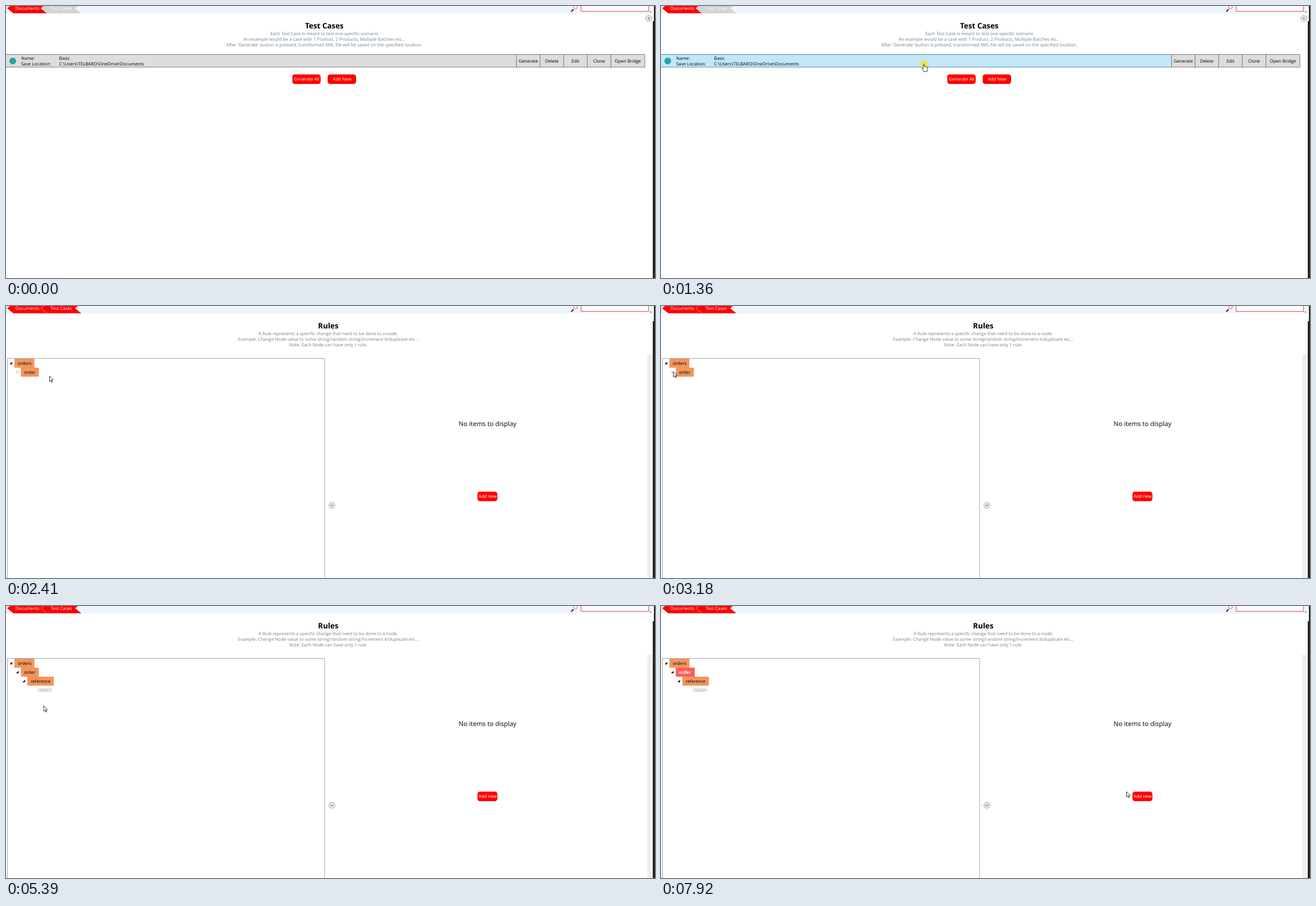
Recreate the animation shown at these times as an HTML page. Size 1155x485 px, loop 7.99 s.

```html
<!DOCTYPE html>
<html lang="en">
<head>
<meta charset="utf-8">
<title>Test case editor</title>
<style>
html, body { margin: 0; width: 100%; height: 100%; overflow: hidden; background: #fff; }
svg { display: block; width: 100%; height: 100%; }
text { font: 7.93px "Open Sans", "Noto Sans", sans-serif; text-rendering: geometricPrecision; white-space: pre; }
.mid text, text.mid { text-anchor: middle; }
.head { font-size: 13.4px; font-weight: 700; }
.note { fill: #708090; }
.red { fill: #f00; }
.white { fill: #fff; }
.cell { fill: #ddd; stroke: #707070; stroke-width: .9; }
.cell.hover { fill: #c4e6f6; stroke: #3c7fb1; }
.node { fill: #f2955d; }
.round { fill: #e4e4e4; stroke: #999; stroke-width: .7; }
.chevron { fill: none; stroke: #333; stroke-width: 1; }
.shut { fill: #fff; stroke: #aaa; stroke-width: .7; }
.cursor { fill: #fff; stroke: #000; stroke-width: .8; stroke-linejoin: round; }
#picked rect { fill: #ff5e54; }
#picked text { fill: #fff; font-weight: 700; }
</style>
</head>
<body>
<svg viewBox="0 0 1155 485">
  <rect width="1150" height="13.5" fill="#eef4fc"/>
  <path class="red" d="M2 4L7 0H67L62 4L73 13H13Z"/>
  <path id="tab" d="M62 4L67 0H128L123 4L134 13H73Z"/>
  <path d="M67 0L62 4L73 13" fill="none" stroke="#fff" stroke-opacity=".55" stroke-width=".7"/>
  <path d="M.5 0V13" stroke="#888" stroke-dasharray="1 1.5" stroke-width=".7"/>
  <g class="mid white"><text x="38" y="7">Documents</text><text x="98.5" y="7">Test Cases</text></g>
  <circle cx="1013.5" cy="2" r="3.2" fill="#fff" stroke="#f0583c"/>
  <path d="M1010 6L1006 10" stroke="#111" stroke-width="1.8"/>
  <rect x="1023.5" y="-5" width="120" height="14.5" fill="#fff" stroke="#e8484c"/>
  <path d="M1145.5 10H1149L1147.2 12Z" fill="#555"/>
  <path d="M1153 0H1155V485H1151V27H1153Z" fill="#25271f"/>

  <g id="cases">
    <g class="mid">
      <text class="head" x="566.5" y="40">Test Cases</text>
      <g class="note">
        <text x="566.5" y="51.6">Each Test Case is meant to test one specific scenario</text>
        <text x="566.5" y="61.9">An example would be a case with 1 Product, 2 Products, Multiple Batches etc...</text>
        <text x="566.5" y="72.3">After 'Generate' button is pressed, transformed XML file will be saved on the specified location.</text>
      </g>
    </g>
    <circle class="round" cx="1144" cy="22" r="5.5"/>
    <path class="chevron" d="M1145 20L1143 22L1145 24"/>
    <rect id="row" class="cell" x="-1" y="86.5" width="909.5" height="22.5"/>
    <circle cx="12" cy="98" r="6" fill="#22a5a8"/>
    <text x="27" y="95.8">Name:</text><text x="94.5" y="95.8">Basic</text>
    <text x="27" y="106.1">Save Location:</text><text x="94.5" y="106.1">C:\Users\TELBARO\OneDrive\Documents</text>
    <g id="actions" class="mid"></g>
    <g class="mid">
      <rect class="red" x="509.5" y="122" width="50.5" height="17" rx="4.5"/>
      <rect class="red" x="572.5" y="122" width="50.5" height="17" rx="4.5"/>
      <text class="white" x="535" y="133">Generate All</text>
      <text class="white" x="598" y="133">Add New</text>
    </g>
  </g>

  <g id="rules">
    <g class="mid">
      <text class="head" x="573.5" y="40">Rules</text>
      <g class="note">
        <text x="573.5" y="51.6">A Rule represents a specific change that need to be done to a node.</text>
        <text x="573.5" y="61.9">Example: Change Node value to some string/random string/increment it/duplicate etc...</text>
        <text x="573.5" y="72.3">Note: Each Node can have only 1 rule.</text>
      </g>
    </g>
    <rect x="2.5" y="93.5" width="564.5" height="400" fill="#fff" stroke="#a3a3a3"/>
    <rect x="1141" y="87" width="9.5" height="398" fill="#f0f0f0"/>
    <path d="M1144.3 93L1146 91.2L1147.7 93" fill="none" stroke="#bbb" stroke-width=".7"/>
    <circle class="round" cx="580" cy="355.3" r="5.5"/>
    <path class="chevron" d="M578 354.5L580 356.5L582 354.5"/>
    <text class="mid" x="857" y="213.7" style="font-size:11.5px">No items to display</text>
    <rect class="red" x="839" y="331" width="35.5" height="17" rx="4.5"/>
    <text class="white mid" x="857" y="342">Add new</text>

    <path d="M11 99.5V104H6.5Z"/>
    <rect class="node" x="15" y="94" width="35.5" height="16"/><text x="21" y="104.7">orders</text>
    <rect class="node" x="26.5" y="110" width="32" height="16"/><text x="32" y="120.8">order</text>
    <g id="picked"><rect x="26.5" y="110" width="33.5" height="16"/><text x="32" y="120.8">order</text></g>
    <path id="shut1" class="shut" d="M19 115.5L22 118L19 120.5Z"/>
    <g id="open1">
      <path d="M22.4 115.5V120H17.9Z"/>
      <rect class="node" x="38" y="126" width="47" height="16"/><text x="44" y="136.6">reference</text>
      <path id="shut2" class="shut" d="M30.8 131.5L33.8 134L30.8 136.5Z"/>
      <g id="open2"><path d="M33.8 131.5V136H29.3Z"/><text x="55.7" y="152.6" fill="#858585">100001</text></g>
    </g>
  </g>

  <g id="pointer">
    <circle id="click" r="7.2" fill="#fae11e" fill-opacity=".75"/>
    <path id="arrow" class="cursor" d="M0 0V9.5L2.2 7.5L3.8 11L5.3 10.3L3.8 7H6.7Z"/>
    <path id="hand" class="cursor" d="M-1.1 .8C-1.1 -.4 1 -.4 1 .8V4.6C1.3 4 2.8 4.1 2.9 5C3.4 4.5 4.7 4.7 4.8 5.6C5.4 5.2 6.6 5.5 6.6 6.6V9.2C6.6 11 5.6 11.5 5.4 13.2H-.6C-.8 11.5 -2.8 9.8 -3.8 7.9C-4.2 6.9 -2.9 6.3 -1.1 8.2Z"/>
  </g>
</svg>
<script>
const LOOP = 7990, ENTER = 140, PAGE = 1500, EXPAND1 = 3780, EXPAND2 = 5260, PICK = 6960;
const clicks = [[1360, 1500], [3710, 3850], [5190, 5260], [6960, 7030]];
// pointer tip: time, x, y
const path = [
  [140, 1090, 478], [400, 700, 230], [760, 468, 103.7], [1700, 468, 103.7],
  [2130, 236, 165], [2410, 77.5, 125], [2960, 26, 117], [3180, 22, 117],
  [3850, 22, 117], [4030, 42, 148], [4240, 49, 139.5], [4460, 46, 134],
  [4990, 34, 133], [5260, 34, 133], [5390, 67, 178], [5530, 73, 199],
  [5930, 62, 132], [6210, 62, 131], [6560, 48, 117], [7100, 48, 117], [7920, 828.5, 331]
];
const $ = id => document.getElementById(id);
const show = (id, on) => $(id).style.display = on ? '' : 'none';
const inside = ([x, y], l, t, r, b) => x >= l && x <= r && y >= t && y <= b;

const edges = [908.5, 950.5, 992.5, 1034.5, 1076.5, 1137];
$('actions').innerHTML = ['Generate', 'Delete', 'Edit', 'Clone', 'Open Bridge'].map((label, i) => {
  const x = edges[i], w = edges[i + 1] - x;
  return `<rect class="cell" x="${x}" y="86.5" width="${w}" height="22.5"/><text x="${x + w / 2}" y="100.8">${label}</text>`;
}).join('');

function tipAt(t) {
  const i = path.findIndex(p => p[0] > t);
  if (i < 0) return path.at(-1).slice(1);
  if (i === 0) return path[0].slice(1);
  const a = path[i - 1], b = path[i], k = (t - a[0]) / (b[0] - a[0]);
  return [a[1] + (b[1] - a[1]) * k, a[2] + (b[2] - a[2]) * k];
}

function draw(t) {
  const tip = tipAt(t), rules = t >= PAGE, open1 = t >= EXPAND1, open2 = t >= EXPAND2;
  const onRow = !rules && t >= ENTER && inside(tip, 0, 86, 908, 109);
  const onNode = rules && (inside(tip, 15, 94, 50, 110) || inside(tip, 27, 110, 59, 126) ||
    open1 && inside(tip, 38, 126, 85, 142));
  const hand = onRow || onNode;

  show('cases', !rules);
  show('rules', rules);
  $('tab').setAttribute('fill', rules ? '#f00' : '#d3d3d3');
  $('row').classList.toggle('hover', onRow);
  show('shut1', !open1);
  show('open1', open1);
  show('shut2', !open2);
  show('open2', open2);
  show('picked', t >= PICK);

  show('pointer', t >= ENTER);
  $('pointer').setAttribute('transform', `translate(${tip})`);
  show('hand', hand);
  show('arrow', !hand);
  show('click', clicks.some(([from, to]) => t >= from && t < to));
}

const start = performance.now();
function tick() {
  draw((performance.now() - start) % LOOP);
  requestAnimationFrame(tick);
}
tick();
</script>
</body>
</html>
```
